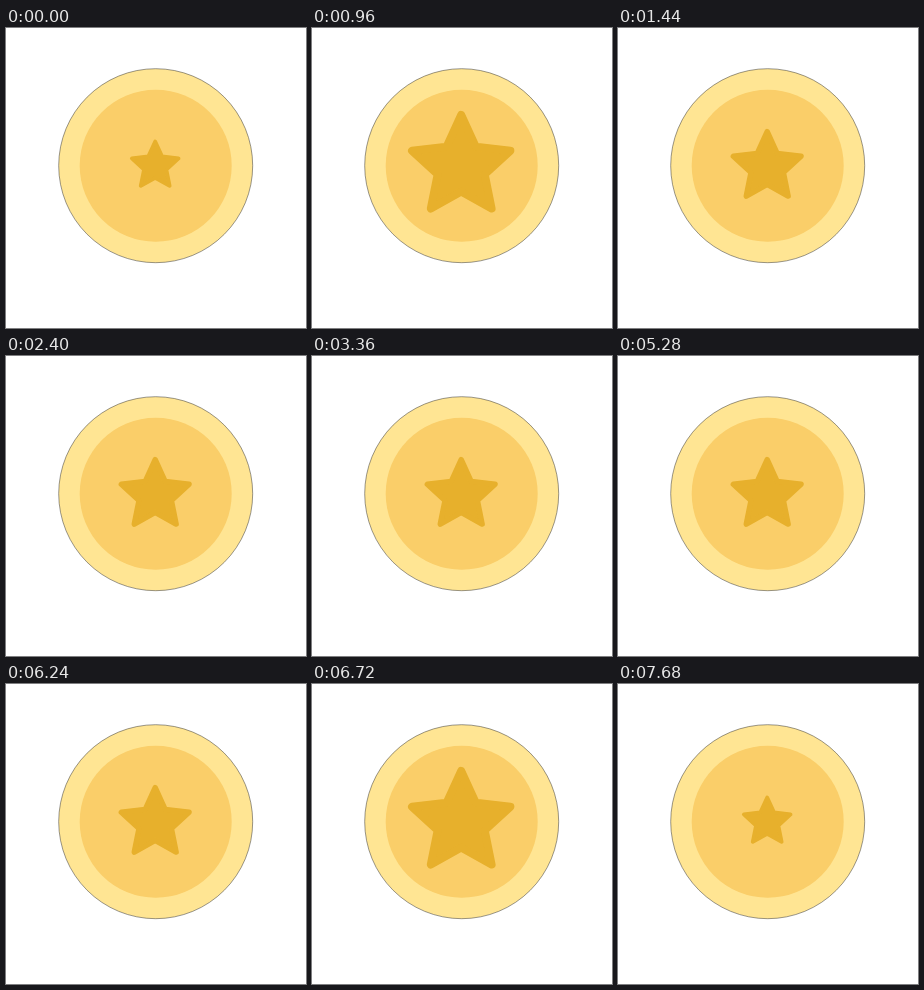
Recreate the animation shown at these times as an HTML page. Size 300 px wide and 300 px high, loop 8 s.

```html
<!DOCTYPE html>
<html lang="en">
<head>
<meta charset="utf-8">
<title>Coin with pulsing star</title>
<style>
  html, body { margin: 0; height: 100%; overflow: hidden; background: #fff; }
  svg { display: block; width: 100%; height: 100%; }
</style>
</head>
<body>
<svg viewBox="0 0 300 300">
  <circle cx="149.7" cy="137.7" r="97" fill="#ffe593" stroke="#333" stroke-width=".5"/>
  <circle cx="149.7" cy="137.7" r="76" fill="#face69"/>
  <polygon id="star" fill="#e7b02c" stroke="#e7b02c" stroke-width="8" stroke-linejoin="round"/>
</svg>
<script>
  const LOOP = 8000, STEP = 480;
  const small = { y: 138, scale: 0.475 };
  const medium = { y: 139.3, scale: 0.688 };
  const large = { y: 138.7, scale: 1 };
  const poses = [small, medium, large, medium];

  const star = document.getElementById('star');
  star.setAttribute('points', Array.from({ length: 10 }, (_, i) => {
    const radius = i % 2 ? 24.7 : 51.7;
    const angle = i * Math.PI / 5;
    return [radius * Math.sin(angle), -radius * Math.cos(angle)];
  }).join(' '));

  function draw() {
    const time = performance.now() % LOOP;
    const { y, scale } = poses[Math.floor(time / STEP) % poses.length];
    star.setAttribute('transform', `translate(149.2 ${y}) scale(${scale})`);
    requestAnimationFrame(draw);
  }
  draw();
</script>
</body>
</html>
```
